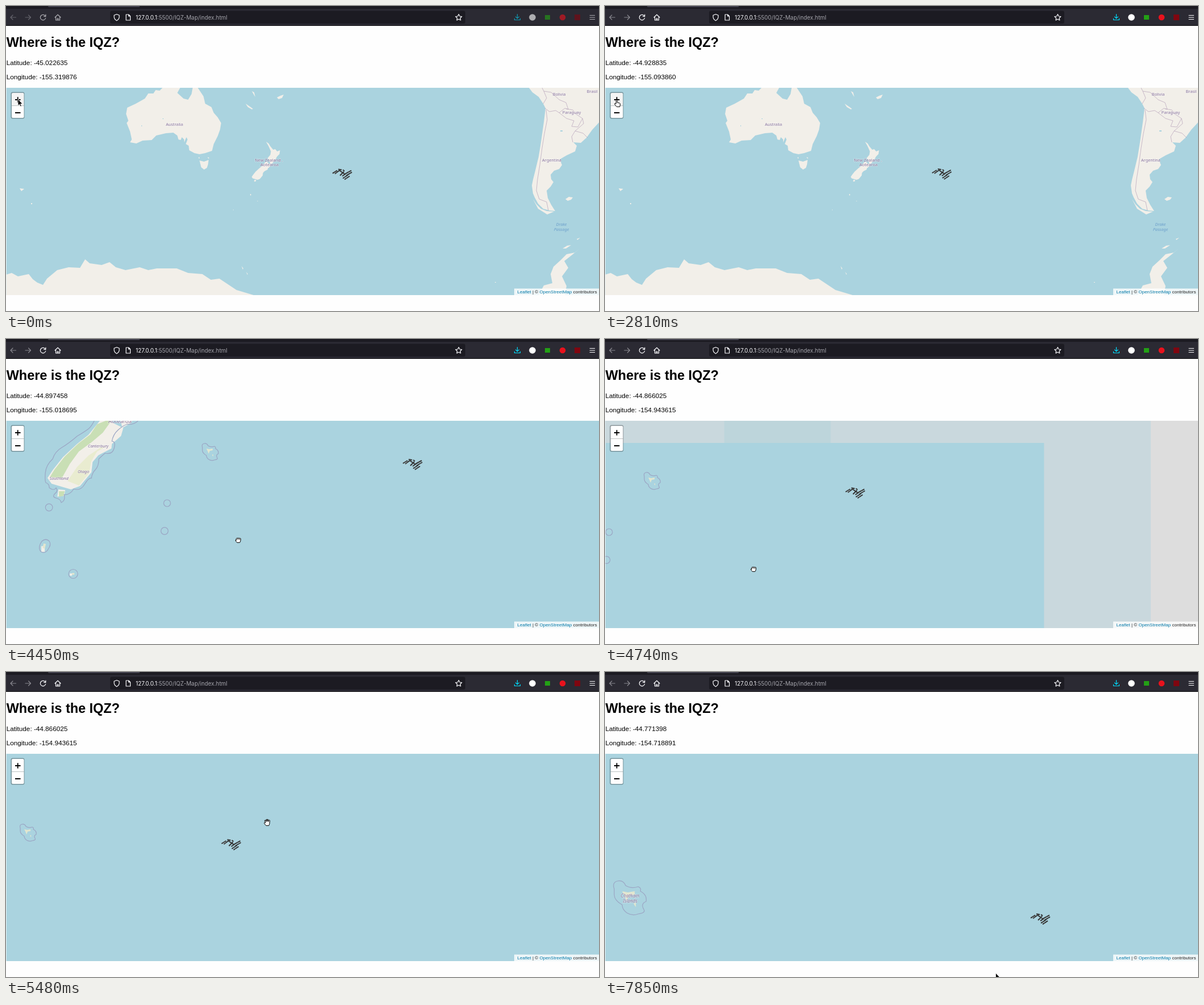
Write an HTML page that moves like this. It is 1042 px wide and 537 px high and loops after 7.99 s.

```html
<!DOCTYPE html>
<html lang="en">
<head>
<meta charset="utf-8">
<title>Where is the IQZ?</title>
<style>
  html, body { margin: 0; width: 100%; height: 100%; overflow: hidden; background: #fefefe; }
  svg { display: block; width: 1042px; height: 537px; }
  text { font-family: "Liberation Sans", Arial, sans-serif; }
  .line { fill: none; stroke: #fbfbfe; stroke-width: 1.2; stroke-linecap: round; stroke-linejoin: round; }
  .land { fill: #f2efe9; }
  .border { fill: none; stroke: #b7a3b9; stroke-width: .7; }
  .coast { fill: none; stroke: #9ba6c4; stroke-width: 1.2; }
  .coast * { vector-effect: non-scaling-stroke; }
  .place text { font-family: "Noto Sans", sans-serif; fill: #806b95; text-anchor: middle;
    stroke: #fff; stroke-opacity: .65; stroke-width: .12em; paint-order: stroke; }
  .place .sea { fill: #6c9fcb; font-style: italic; stroke: none; }
  .hand { fill: #fff; stroke: #000; stroke-width: 1; stroke-linejoin: round; }
</style>
</head>
<body>
<svg viewBox="0 0 1042 537">
  <defs><clipPath id="frame"><path d="M.7 144H1042V509H.7z"/></clipPath></defs>

  <!-- browser bar -->
  <path fill="#2b2a33" d="M0 0H1042V35H0z"/>
  <path fill="#1c1b22" d="M0 0H1042V5H0z"/>
  <path fill="#42414d" d="M74 0H235V1q0 1-2 1H76q-2 0-2-1z"/>
  <path fill="#0c0c0d" d="M0 34H1042V35H0z"/>
  <rect x="183" y="8.5" width="624" height="22.5" rx="3" fill="#1c1b22"/>
  <g class="line">
    <path d="M194.500 14.500l4.500 1.800v3q0 4-4.500 6.500q-4.500-2.500-4.500-6.500v-3z"/>
    <path d="M211 15h4.500l3 3v7H211zM215.500 15v3h3"/>
    <path d="M795.500 14.500l1.700 3.500 3.800.5-2.800 2.700.7 3.800-3.400-1.800-3.400 1.800.7-3.800-2.800-2.700 3.800-.5z"/>
  </g>
  <text x="228" y="23.700" font-size="9.900" fill="#a5a5ac" style="font-family:Inter,sans-serif"><tspan fill="#fbfbfe">127.0.0.1</tspan>:5500/IQZ-Map/index.html</text>
  <g id="tools">
    <path class="line" opacity=".45" d="M17.500 20H8M12 16l-4 4 4 4M34 20h9.500M39.500 16l4 4-4 4"/>
    <path class="line" d="M69 17.500A4.700 4.700 0 1 0 69.700 21M69.800 15v3.300h-3.300M86 20l5-4.800 5 4.800M87.500 19.500V25h7v-5.500M90 25v-3h2v3M1026 16.500h8.500M1026 20h8.500M1026 23.500h8.500"/>
    <path class="line" style="stroke:#00ddff" d="M898.500 14.500v7M895.500 18.800l3 3 3-3M893.500 22v2.500h10V22"/>
    <circle cx="925" cy="20" r="5.800" fill="#fff"/>
    <path fill="#23a015" d="M947 16h9v8h-9z"/>
    <circle cx="978" cy="20" r="5.300" fill="#e8121d"/>
    <path fill="#800610" d="M999 15h10v10h-10z"/>
  </g>

  <!-- page -->
  <text x=".7" y="71.800" font-size="23.440" font-weight="bold">Where is the IQZ?</text>
  <text id="lat" x=".7" y="104" font-size="11.720"></text>
  <text id="lon" x=".7" y="129.300" font-size="11.720"></text>

  <g clip-path="url(#frame)">
    <path fill="#aad3df" d="M0 144H1042V509H0z"/>
    <g id="map">
      <g class="land">
        <path d="M275 144L270 149 263 148 259 154 250 154 244 163 228 172 213 179 211 190 215 202 212 206 218 221 221 235 218 240 229 242 240 237 256 236 264 228 281 224 294 223 301 228 303 235 307 236 309 231 313 235 313 240 317 231 319 235 316 243 321 246 322 254 331 259 340 261 350 259 362 255 365 243 372 229 376 218 378 206 372 196 365 188 361 178 350 172 347 159 341 150 337 144H328L326 155 320 165 312 163 301 153 306 144z"/>
        <path d="M340 272L348 274 356 271 355 279 353 285 348 288 343 284zM338 267l2-1 0 3zM354 266l3 1-1 2z"/>
        <path d="M457 239L461.500 242 464.500 247 469.500 253 473 252 476.500 256 481.500 254 480.500 260.700 476.500 264.700 473 270.700 468 277 464.500 279 463 271 459.500 268 464.500 262 465.500 256 461.500 247z"/>
        <path d="M431.700 301L434 297.500 438.500 291.800 444.700 286 449.700 282 454.700 275.800 458.500 274 461 277 465 279 464 282.500 460 286 459.800 288 454 291 451.500 294 451 298.500 446 304.500 442 306 438.500 305 433.500 303.500zM436.500 306l3 .3-.5 2.500-3 .4z"/>
        <path d="M919 144L925 152 936 160 944 172 948 180 945 205 940 240 936 265 930 290 926 306 924 316 926 330 929 337 935 348 944 357 955 360 965 361 958 350 952 338 950 325 957 318 962 310 958 305 957 297 963 290 972 287 977 280 973 270 985 263 1000 256 1003 246 997 240 1010 241 1020 232 1030 218 1042 205V144z"/>
        <path d="M926 340l6 9 8 8 10 4 13 1-12 5-16-10zM983 340l6-4 7 1-3 4-6 2z"/>
        <path d="M0 473L10 470 21 476 40 472 47 481 55 487 65 491 72 480 90 465 110 460 130 461 139 446 147 453 168 456 182 451 193 460 210 465 235 460 250 465 265 462 300 462 320 470 345 472 360 482 375 480 390 490 405 500 435 509H0z"/>
        <path d="M1008 427L1000 434 985 437 974 448 962 459 957 472 960 488 945 492 936 509H982L985 493 977 476 988 461 981 449 995 438zM978 427l8-5 7-1-9 6zM1003 410l6-2-5 4z"/>
        <path d="M421 172l6 4 7 5-2 1-7-4zM476 161l6-3 6-2-3 6-6 2zM432 150l4 2 2 8-2-3zM24 321l8 1-5 4zM44 347h2v2h-2zM429 331h1.500v2.500H429zM441.500 343h1v1h-1zM399 358.500h1v1h-1zM414 458l3 4-1 2zM422 468l3 4-1 1zM859 486h2v1h-2z"/>
      </g>
      <g class="border">
        <path d="M949 183L951 200 946 225 942 250 938 280 934 305 932 325 937 340 950 345 953 360M947 180L955 186 966 184 972 188 982 180 988 182 984 170 972 165 958 152 945 150M972 188L985 198 998 202 994 212 1005 213 1013 198 1001 190 996 183 984 181M1013 198L1015 207 1000 220 994 230 996 240M1000 220L1014 224 1022 232M945 150L942 144M944 172L950 162 945 150"/>
        <path fill="#aad3df" stroke="none" d="M974 219h4v2h-4zM275 198h2v1h-2zM238 210h1v2h-1z"/>
      </g>
      <g id="far" class="place" font-size="7.300">
        <text x="296" y="211">Australia</text>
        <text x="462" y="274" font-size="7.500">New Zealand .</text>
        <text x="463" y="282.300" font-size="7.500">Aotearoa</text>
        <text x="972" y="158">Bolivia</text>
        <text x="1030" y="153">Brasil</text>
        <text x="994" y="190">Paraguay</text>
        <text x="959" y="274">Argentina</text>
        <text class="sea" x="976" y="387">Drake</text>
        <text class="sea" x="976" y="395.500">Passage</text>
        <text id="city" x="341" y="261.500" font-size="4.600" opacity=".35">Melbourne</text>
      </g>
      <g id="near" transform="translate(413.500 239.800) scale(.25)">
        <path fill="#c9dfb5" d="M77 243L85 230 103 207 127 184 148 168 160 150 175 144H185L170 165 150 182 128 198 112 220 98 245zM93 268l10 0-2 8-8 2z"/>
        <path fill="#e9ecd0" d="M108 250L125 225 145 205 165 192 178 188 160 198 150 215 146 236 128 258z"/>
        <path fill="#e2e6cf" d="M66 360l4 1-2 8-4-1zM116 412h4v3h-4zM352 193l5 1 6-1 0 3-5 1-2 5-2-5zM362 204l2-1 0 4z"/>
        <g class="coast">
          <path d="M155 144Q150 154 145 158T125 171Q110 184 98 191T82 211Q70 222 69 236T70 253Q76 255 76 262Q84 268 88 262Q92 268 86 272Q80 278 88 280T97 288Q105 284 102 274Q112 275 119 264Q131 268 138 256T150 245Q151 236 157 230T163 211Q168 206 174 201Q187 204 190 192T186 180Q188 168 197 160T213 150Q225 151 232 144"/>
          <circle cx="283" cy="289" r="6"/><circle cx="278.500" cy="338" r="6.300"/>
          <circle cx="75.500" cy="296.500" r="6.300"/><circle cx="118" cy="413.500" r="8"/>
          <path d="M63 356Q70 350 76 356Q80 362 74 370Q70 378 62 375Q56 370 60 361z"/>
          <path d="M345 191Q343 185 348 184Q353 183 355 188Q360 191 366 189Q369 190 368 193Q374 196 373 202Q368 204 371 209Q373 212 366 213Q361 215 356 212Q352 209 352 205Q345 201 345 196z"/>
        </g>
        <g class="place" font-size="7.300" font-style="italic">
          <text x="93" y="248">Southland</text>
          <text x="136" y="236">Otago</text>
          <text x="162" y="191">Canterbury</text>
          <text x="200" y="148" font-size="9.500" font-style="normal">Aotearoa</text>
        </g>
        <g id="isles" class="place" font-size="4" font-style="italic">
          <text x="359" y="198.500">Chatham</text>
          <text x="359" y="202.800">Islands</text>
        </g>
      </g>
    </g>
    <g id="loading">
      <path fill="#ddd" d="M0-300H1100V600H0z" transform="translate(520)"/>
      <path fill="#c9d8dd" d="M-700-300H520V600H333V-88H-700z"/>
      <path fill="#bdd5db" d="M-229-300H-42V-88H-229z"/>
    </g>
    <g id="station" fill="none" stroke="#353535" stroke-width="2">
      <path d="M-17-1l8-5M-13 0l8-6M-7-8l6 1M-5-6l10 7M-4 3l7-7M1-7l3 2M0 4l6-4M5 0l11-6M7 3l10-6M1 8l9-6M4 10l9-6"/>
      <path stroke="#aaa" stroke-width=".4" d="M-15-4l4 4M-12-5l3 4M9-5l6 5M3 5l6 4"/>
    </g>
  </g>

  <!-- map controls -->
  <rect x="8.500" y="151.500" width="24" height="47" rx="3" fill="#000" fill-opacity=".3"/>
  <path id="plus" d="M10 155q0-2 2-2H29.500q2 0 2 2V175H10z"/>
  <path fill="#fff" d="M10 175.700H31.500V195q0 2-2 2H12q-2 0-2-2z"/>
  <path fill="#ccc" d="M10 175H31.500v.7H10z"/>
  <path stroke="#000" stroke-width="1.800" d="M16 165h9.500M20.700 160.300v9.500M16 188h9.500"/>
  <path fill="#fff" fill-opacity=".8" d="M893 497.500H1042V509H893z"/>
  <text x="1038.500" y="506" font-size="8.050" fill="#222" text-anchor="end"><tspan fill="#0078a8">Leaflet</tspan> | © <tspan fill="#0078a8">OpenStreetMap</tspan> contributors</text>

  <g id="cursor">
    <path id="arrow" stroke="#fff" stroke-width=".8" d="M0 0v11.500l2.600-2.400 1.900 4 1.900-.8-1.900-3.900h3.500z"/>
    <path id="point" class="hand" d="M-2.500 1v-5.500q0-1.200 1-1.200t1 1.200V-1l4 .9q1.300.4 1.200 2L4 6.500H-1.500l-3.500-4.500q-.6-1.500.8-1.500z"/>
    <path id="open" class="hand" d="M-3 1L-4.500-3q0-1.300 1.500-1L-2-1.500V-5q1-1.300 1.900 0v3V-5q1-1.300 2 0v3.500L2.700-4q1.300-.8 1.900.3L4 2.500 2.800 5.500H-2L-5.300 1.500q-.3-1.400 1-1.300z"/>
    <path id="fist" class="hand" d="M-3.500 1v-3.500q1-1.800 2-.7 1-1.300 2 0 1-1 2 .2 1.500-.8 2 .8L4 2 2.700 4.500H-2L-4.500 1.500Q-5.500-.5-3.500 0zM-1.500-3v2M.5-3v2M2.500-2.700v2"/>
  </g>
</svg>
<script>
const LOOP = 7990, STEP = 148;
const LAT = [-45.022635, -44.991412, -44.960146, -44.928835, -44.897458, -44.866025, -44.834536, -44.802994, -44.771398];
const LON = [-155.319876, -155.244455, -155.169117, -155.093860, -155.018695, -154.943615, -154.868617, -154.793710, -154.718891];
const UPDATES = [0, 5, 16, 19, 26, 32, 38, 45, 50];
const ANCHOR = { x: 592.1, y: 294.8, lat: LAT[4], lon: LON[4] };

// step, zoom, screen x and y of the anchor
const VIEW = [
  [0, 1, 592.1, 294.8], [20, 1, 592.1, 294.8], [22, 2, 663.2, 263.1], [24, 2, 663.2, 263.1],
  [26, 4, 805.4, 199.7], [28, 4, 805.4, 199.7], [29, 4, 770, 207], [30, 4, 714.5, 220],
  [32, 4, 438.5, 271], [33, 4, 420, 284], [36, 4, 394.5, 304], [44, 4, 394.5, 304], [46, 8, 755, 440]
];
// step, x, y
const POINTER = [
  [0, 21, 164], [11, 21, 164], [12, 22, 171], [26, 22, 171], [28, 499, 334], [30, 408, 354],
  [32, 261, 405], [33, 261, 405], [36, 459, 265], [37, 459, 265], [42, 34, 168], [49, 34, 168], [53, 686.5, 530]
];

const $ = id => document.getElementById(id);
const set = (id, name, value) => $(id).setAttribute(name, value);
const show = (id, on) => set(id, "display", on ? "inline" : "none");

function sample(keys, n) {
  const i = keys.findIndex(k => k[0] > n);
  if (i < 0) return keys[keys.length - 1].slice(1);
  const a = keys[i - 1], b = keys[i], f = (n - a[0]) / (b[0] - a[0]);
  return a.slice(1).map((v, j) => v + (b[j + 1] - v) * f);
}

function cursorAt(n) {
  if (n < 12 || n > 49) return "arrow";
  if (n < 27) return "point";
  return n > 27 && n < 34 ? "fist" : "open";
}

function draw(n) {
  const k = UPDATES.filter(u => u <= n).length - 1;
  $("lat").textContent = "Latitude: " + LAT[k].toFixed(6);
  $("lon").textContent = "Longitude: " + LON[k].toFixed(6);

  const [zoom, x, y] = sample(VIEW, n);
  set("map", "transform", `translate(${x} ${y}) scale(${zoom}) translate(${-ANCHOR.x} ${-ANCHOR.y})`);
  const sx = x + (LON[k] - ANCHOR.lon) * 4.17 * zoom;
  const sy = y - (LAT[k] - ANCHOR.lat) * 5.9 * zoom;
  set("station", "transform", `translate(${sx} ${sy})`);
  set("loading", "transform", `translate(${x} ${y})`);
  show("loading", n === 31 || n === 32);
  show("far", n < 27);
  show("city", n > 22);
  show("near", n > 26);
  show("isles", n > 46);

  set("tools", "opacity", n < 11 ? .62 : 1);
  set("plus", "fill", n < 27 ? "#f4f4f4" : "#fff");
  const [cx, cy] = sample(POINTER, n);
  set("cursor", "transform", `translate(${cx} ${cy})`);
  for (const id of ["arrow", "point", "open", "fist"]) show(id, id === cursorAt(n));
}

const start = performance.now();
function tick() {
  const t = (performance.now() - start) % LOOP;
  draw(Math.min(53, Math.floor((t + 10) / STEP)));
  requestAnimationFrame(tick);
}
tick();
</script>
</body>
</html>
```
